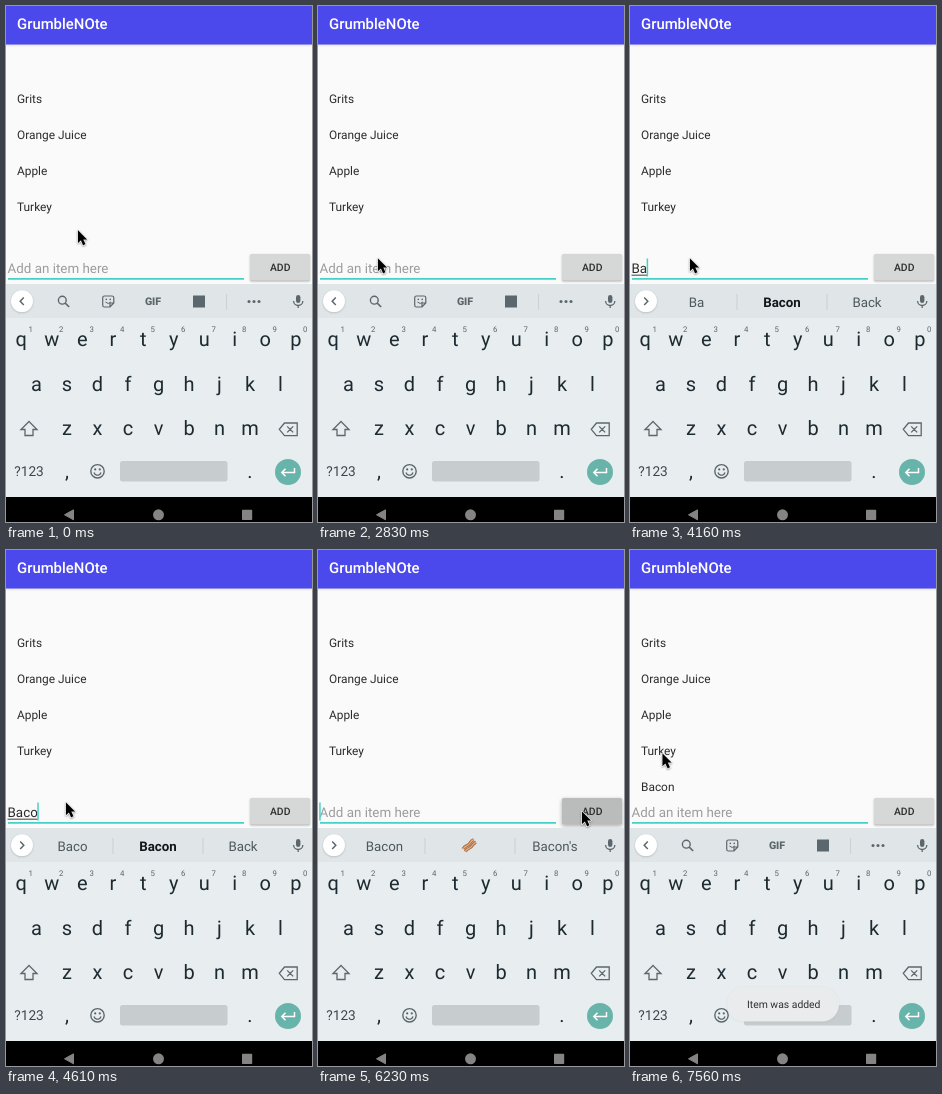
Write an HTML page with a canvas that moves like this. It is 306 px wide and 516 px high and loops after 8 s.

```html
<!DOCTYPE html>
<html lang="en">
<head>
<meta charset="utf-8">
<title>Shopping list</title>
<style>
html, body { margin: 0; width: 100%; height: 100%; overflow: hidden; background: #fafafa; }
canvas { display: block; width: 306px; height: 516px; }
</style>
</head>
<body>
<canvas id="stage"></canvas>
<script>
const W = 306, H = 516, LOOP = 8000;
const canvas = document.getElementById('stage');
const ctx = canvas.getContext('2d');
const ratio = window.devicePixelRatio || 1;
canvas.width = W * ratio;
canvas.height = H * ratio;
ctx.textRendering = 'geometricPrecision';

const FONT = 'Roboto, "Open Sans", sans-serif';
const TEAL = '#45d2c4', ICON = '#5c676d', KEY = '#1d2a30', INK = '#2b2b2b';
const ITEMS = ['Grits', 'Orange Juice', 'Apple', 'Turkey'];

// Pointer position held from each time on: [ms, x, y]
const POINTER = [
  [0, 72, 224.3], [150, 72, 223.8], [290, 71.5, 223],
  [2380, 68, 240], [2530, 63, 256.5], [2830, 60, 252.5],
  [5350, 112, 254], [5500, 214, 259], [5640, 253.8, 262], [5940, 264, 261.5],
  [6530, 160, 252], [6680, 71.5, 239.5], [6830, 52, 222], [6970, 36, 206], [7120, 32.5, 203.5]
];
const CARET_ON = [[290, 890], [1340, 1790], [2380, 2830], [3430, 3870],
  [4160, 5350], [5790, 6680], [7120, 7560]];
const TYPED = [[0, ''], [4160, 'Ba'], [4310, 'Bac'], [4610, 'Baco'], [4910, 'Bacon'], [6230, '']];

const clamp = v => Math.max(0, Math.min(1, v));
const held = (list, t) => list.filter(k => k[0] <= t).pop();
const within = (t, a, b) => t >= a && t < b;

function text(s, x, y, size, color, align = 'left', weight = 400) {
  ctx.font = `${weight} ${size}px ${FONT}`;
  ctx.fillStyle = color;
  ctx.textAlign = align;
  ctx.fillText(s, x, y);
}

function rect(x, y, w, h, color, r = 0) {
  ctx.fillStyle = color;
  ctx.beginPath();
  ctx.roundRect(x, y, w, h, r);
  ctx.fill();
}

function disc(x, y, r, color) {
  ctx.fillStyle = color;
  ctx.beginPath();
  ctx.arc(x, y, r, 0, 7);
  ctx.fill();
}

function line(d, color, width = 1.4, fill) {
  const p = new Path2D(d);
  if (fill) { ctx.fillStyle = fill; ctx.fill(p); }
  ctx.strokeStyle = color;
  ctx.lineWidth = width;
  ctx.stroke(p);
}

function ring(x, y, r, width = 1.4, from = 0, to = Math.PI * 2) {
  ctx.strokeStyle = ICON;
  ctx.lineWidth = width;
  ctx.beginPath();
  ctx.arc(x, y, r, from, to);
  ctx.stroke();
}

function shadow(color, blur, dy) {
  ctx.shadowColor = color;
  ctx.shadowBlur = blur * ratio;
  ctx.shadowOffsetY = dy * ratio;
}

function faded(alpha, draw) {
  if (alpha <= 0) return;
  ctx.save();
  ctx.globalAlpha = alpha;
  draw();
  ctx.restore();
}

function header() {
  ctx.save();
  shadow('rgba(0,0,0,.25)', 3, 1);
  rect(0, -4, W, 42.4, '#4b48ec');
  ctx.restore();
  text('GrumbleNOte', 11, 23.3, 14.9, '#fff', 'left', 500);
}

function list(alpha) {
  ITEMS.forEach((s, i) => text(s, 11, 97 + i * 36, 11.9, INK));
  faded(alpha, () => text('Bacon', 11, 241, 11.9, INK));
}

function field(t, typed) {
  if (typed) {
    text(typed, 1.5, 267, 13.4, INK);
    rect(1.5, 268.7, ctx.measureText(typed).width, 0.9, INK);
  } else {
    text('Add an item here', 1.5, 267, 13.4, '#9c9c9c');
  }
  rect(2, 272, 236, 1.8, TEAL);
  if (CARET_ON.some(([a, b]) => within(t, a, b))) {
    const x = typed ? 1 + ctx.measureText(typed).width : 1.2;
    rect(x, 252.5, 1.5, 18, TEAL);
  }
}

function button(t) {
  const down = within(t, 6090, 6380);
  ctx.save();
  shadow('rgba(0,0,0,.3)', down ? 4 : 2, down ? 1.6 : 0.8);
  rect(244, 248, 60, 26.6, '#d6d7d7', 1.5);
  ctx.restore();
  if (down) rect(244, 248, 60, 26.6, 'rgba(0,0,0,.13)', 1.5);
  text('ADD', 274.2, 265.2, 10.4, INK, 'center', 500);
}

function mic() {
  rect(290, 289, 4.4, 8, ICON, 2.2);
  line('M287.6 295 C287.6 301 296.8 301 296.8 295 M292.2 299.5 V302', ICON, 1.3);
}

function bacon() {
  ctx.save();
  ctx.translate(151.5, 295.6);
  ctx.rotate(-0.72);
  for (const y of [-1.7, 1.7]) {
    const d = `M-7 ${y} q2.3 -.8 4.7 0 t4.7 0 t4.7 0`;
    line(d, '#a9673f', 3.2);
    line(d, '#e6b283', 1.2);
  }
  ctx.restore();
}

function tools() {
  line('M17.8 291.5 L14.2 295.2 L17.8 298.9', ICON, 1.5);
  ring(56.3, 294.2, 3.9);
  line('M59.2 297.1 L63.2 301', ICON, 1.6);
  line('M98.5 290 H106 Q107.8 290 107.8 291.8 V297 L104 301 H98.5 Q96.7 301 96.7 299.2 V291.8 Q96.7 290 98.5 290 M107.8 297 H104 V301', ICON, 1.2);
  disc(100.3, 293.4, 0.8, ICON);
  disc(104.2, 293.4, 0.8, ICON);
  line('M99.4 296 Q102.2 299 105 296', ICON, 1);
  text('GIF', 147, 299, 10.6, ICON, 'center', 900);
  rect(187, 289.5, 12, 12, ICON);
  rect(220, 288, 1, 16, '#cbd0d3');
  for (let i = -1; i < 2; i++) disc(248 + i * 5, 295.6, 1.5, ICON);
}

function hints(typed) {
  const word = typed || 'Bacon';
  line('M14.2 291.5 L17.8 295.2 L14.2 298.9', ICON, 1.5);
  rect(106.5, 288, 1, 16, '#cbd0d3');
  rect(196.5, 288, 1, 16, '#cbd0d3');
  text(word, 66.5, 300.6, 13.3, '#4d585e', 'center');
  if (word === 'Bacon') bacon();
  else text('Bacon', 152, 300.6, 13.3, '#11181b', 'center', 700);
  text(word === 'Bacon' ? "Bacon's" : 'Back', 237, 300.6, 13.3, '#4d585e', 'center');
}

function letters(row, x, y, caps) {
  [...row].forEach((c, i) =>
    text(caps ? c.toUpperCase() : c, x + i * 30.5, y, 20, KEY, 'center'));
}

function keyboard(t, typed) {
  const caps = within(t, 4020, 4160);
  rect(0, 278, W, 213, '#e8edf0');
  rect(0, 278, W, 34, '#e0e5e8');

  ctx.save();
  shadow('rgba(0,0,0,.2)', 2, 0.6);
  disc(16, 295.3, 11, '#fff');
  ctx.restore();
  if (within(t, 4160, 6830)) hints(typed);
  else tools();
  mic();

  letters('qwertyuiop', 15.3, 340.3, caps);
  letters('asdfghjkl', 30.5, 384.8, caps);
  letters('zxcvbnm', 61, 429.3, caps);
  [...'1234567890'].forEach((c, i) =>
    text(c, 24.6 + i * 30.5, 326, 7.8, '#59656b', 'center'));

  line('M23 415.5 L31 423.5 H27 V429.5 H19 V423.5 H15 Z', ICON, 1.3, caps ? ICON : null);
  line('M278.5 417 H291.2 V429.6 H278.5 L273.3 423.3 Z M281.2 420.4 L287.2 426.4 M287.2 420.4 L281.2 426.4', ICON, 1.3);

  text('?123', 23, 470, 13.7, '#3c474d', 'center');
  text(',', 61, 472, 20, KEY, 'center');
  ring(91.5, 465.3, 6.7);
  disc(89.2, 463.4, 1.1, ICON);
  disc(93.8, 463.4, 1.1, ICON);
  ring(91.5, 465.6, 3.6, 1.3, 0.25, Math.PI - 0.25);
  rect(114, 455, 107.5, 20.5, '#c7cccf', 2.5);
  text('.', 244, 472, 20, KEY, 'center');
  disc(282, 466, 13, '#68b3aa');
  line('M288.5 462 V466.5 H276 M279.5 462.8 L275.8 466.5 L279.5 470.2', '#fff', 1.5);
}

function navBar() {
  const grey = '#848484';
  rect(0, 491, W, 25, '#000');
  line('M58.5 508.8 L67.5 503.8 V513.8 Z', grey, 1, grey);
  disc(152.5, 508.8, 5.5, grey);
  rect(236, 503.8, 10.2, 10.2, grey, 0.7);
}

function toast(alpha) {
  faded(alpha, () => {
    ctx.save();
    shadow('rgba(0,0,0,.06)', 3, 0.5);
    rect(97, 437, 112, 34.5, '#eaebec', 17);
    ctx.restore();
    text('Item was added', 153.7, 458, 10.4, '#303030', 'center');
  });
}

function pointer(t) {
  const [, x, y] = held(POINTER, t);
  ctx.save();
  ctx.translate(x, y);
  ctx.scale(0.94, 0.94);
  ctx.lineJoin = 'round';
  shadow('rgba(0,0,0,.3)', 2, 0.8);
  const shape = 'M0 0 V13.4 L3.1 10.6 L5.4 15.8 L7.9 14.7 L5.6 9.7 H9.6 Z';
  line(shape, '#fff', 1.7, '#fff');
  ctx.shadowColor = 'transparent';
  line(shape, '#000', 0.2, '#000');
  ctx.restore();
}

function draw(t) {
  const typed = held(TYPED, t)[1];
  const step = 147.2;
  const since = Math.floor((t - 6530) / step) * step;
  ctx.setTransform(ratio, 0, 0, ratio, 0, 0);
  rect(0, 0, W, H, '#fafafa');
  list(since < 0 ? 0 : clamp((since + 60) / 400));
  field(t, typed);
  button(t);
  header();
  keyboard(t, typed);
  navBar();
  toast(clamp(since / 420));
  pointer(t);
}

const start = performance.now();
function frame() {
  draw((performance.now() - start) % LOOP);
  requestAnimationFrame(frame);
}
frame();
</script>
</body>
</html>
```
